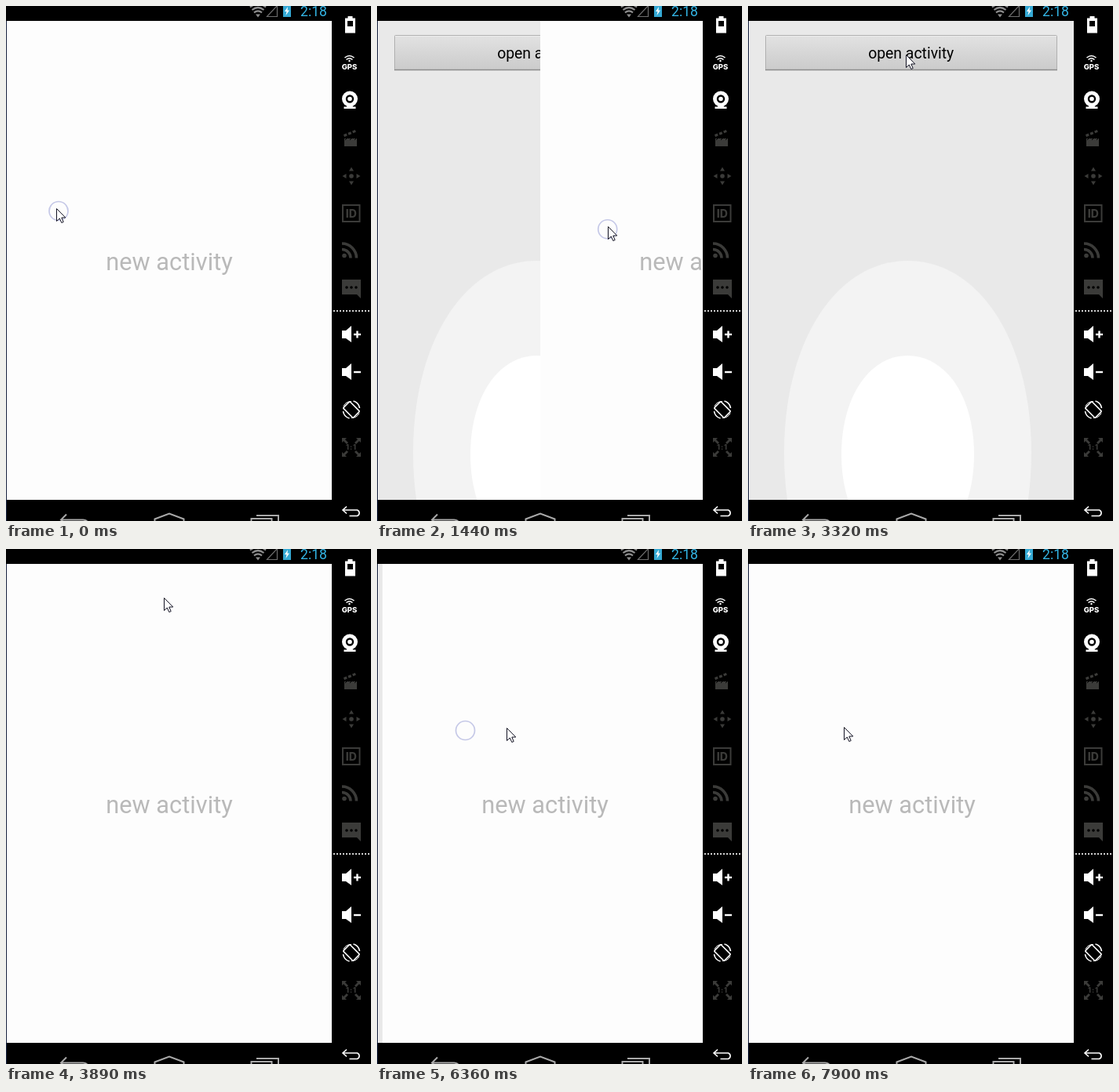
Write an HTML page that moves like this. It is 465 px wide and 657 px high and loops after 8 s.

```html
<!DOCTYPE html>
<html lang="en">
<head>
<meta charset="utf-8">
<title>Swipe back</title>
<style>
html, body { margin: 0; width: 100%; height: 100%; overflow: hidden; background: #000; }
svg { display: block; width: 465px; height: 657px; }
text { font-family: Roboto, sans-serif; }
.line { fill: none; stroke-width: 2; }
.bold { font-family: Inter, sans-serif; font-weight: 800; }
</style>
</head>
<body>
<svg viewBox="0 0 465 657">
  <defs>
    <linearGradient id="face" x1="0" y1="0" x2="0" y2="1">
      <stop offset="0" stop-color="#e2e2e2"/>
      <stop offset="1" stop-color="#cbcbcb"/>
    </linearGradient>
    <g id="speaker">
      <path d="M428 -5h5l7 -6v21l-7 -5h-5z"/>
      <path d="M443 0h9" stroke="#fff" stroke-width="2.4"/>
    </g>
    <path id="corner" d="M0 0h6l-2 2l4 4l-2 2l-4 -4l-2 2z"/>
    <path id="tip" d="M0 -11.5l3 5h-6z"/>
  </defs>

  <!-- first screen -->
  <rect width="415" height="657" fill="#e9e9e9"/>
  <path id="outer" fill="#f3f3f3"/>
  <path id="inner" fill="#fff"/>
  <rect x="22.5" y="37.5" width="371" height="44" rx="1" fill="url(#face)" stroke="#b0b0b0"/>
  <path d="M22 81.5h372" stroke="#8c8c8c" stroke-width="1.4"/>
  <path d="M23 38.5h370" stroke="#ececec"/>
  <text x="207.7" y="67" font-size="19.4" text-anchor="middle">open activity</text>

  <!-- second screen -->
  <g id="page">
    <rect x="1" y="19" width="414" height="611" fill="#fdfdfd"/>
    <text x="208" y="336.5" font-size="30.8" text-anchor="middle" fill="#b9b9b9">new activity</text>
  </g>
  <circle id="ring" r="12" fill="none" stroke="#c5c8e7" stroke-width="1.7"/>
  <path id="arrow" d="M.5 .5V16.5L4.3 13L6.8 18.5L9.2 17.5L6.8 12H11.8Z" fill="#fff" stroke="#112"/>

  <!-- status bar -->
  <rect width="465" height="19"/>
  <g fill="none" stroke="#8d8d8d" stroke-width="2.2">
    <path d="M311 1.5q10 -8 20 0M313.5 5q7.5 -6 15 0M316 8.3q5 -4 10 0"/>
    <path d="M318 10.5h6l-3 4z" fill="#8d8d8d" stroke="none"/>
    <path d="M332.5 13.5h13v-14z" stroke="#6d6d6d" stroke-width="1.2"/>
  </g>
  <rect x="353" y="-1" width="10" height="15" fill="#35a9d4"/>
  <path d="M359 1l-4 6h2.5l-1 5l4.5 -6.5h-2.5z" fill="#fff"/>
  <text x="375" y="12.5" font-size="17.6" fill="#33b5e5">2:18</text>

  <!-- navigation bar -->
  <rect y="630" width="465" height="27"/>
  <g class="line" stroke="#a9a9a9">
    <path d="M77 648.5l-7 7l7 7M70 655.5h28q6 0 6 5"/>
    <path d="M189.5 658v-3.500l18.5 -7l18.5 7v3.5"/>
    <path d="M312.5 658v-4h26v4M319 650h28v8"/>
  </g>
  <path d="M.5 19V657" stroke="#17223f"/>

  <!-- tool strip -->
  <rect x="415" width="50" height="657"/>
  <g fill="#fff">
    <path d="M435.5 13h6v2.5h3.5v19h-13v-19h3.5zM435 19v7h7v-7z" fill-rule="evenodd"/>
    <path d="M431.5 66q6 -5 12 0M433.5 68.5q4 -3.5 8 0" fill="none" stroke="#fff" stroke-width="1.5"/>
    <circle cx="437.5" cy="70" r="1.2"/>
    <text class="bold" x="437.5" y="80.5" font-size="9.5" text-anchor="middle">GPS</text>
    <circle cx="438" cy="118.5" r="10"/>
    <circle cx="438" cy="118.5" r="4" fill="none" stroke="#000" stroke-width="2.4"/>
    <path d="M435 127h6l1 1.5h3.5v2.5h-15v-2.5h3.5z"/>
    <use href="#speaker" y="419"/>
    <path d="M447.5 414.5v9" stroke="#fff" stroke-width="2.4"/>
    <use href="#speaker" y="467"/>
  </g>
  <g fill="none" stroke="#fff" stroke-width="1.6">
    <rect x="434" y="506" width="12" height="18" rx="1.5" transform="rotate(-45 440 515)"/>
    <path d="M429.5 517a11 11 0 0 0 8 9M450.5 513a11 11 0 0 0 -8 -9"/>
    <path d="M440 504.5a11 11 0 0 0 -10 6M440 525.5a11 11 0 0 0 10 -6" stroke-width="1"/>
    <path d="M434 638.5l-5 4.5l5 4.5M429 643h18.5a4 4 0 0 1 0 7.5h-10"/>
  </g>
  <g fill="#3b3b39">
    <path d="M431 169h16v10h-16z"/>
    <path d="M430.5 165.5l16 -6.5" stroke="#3b3b39" stroke-width="3" stroke-dasharray="4 2"/>
    <path d="M432 171l3 -3M438 171l3 -3M444 171l3 -3" stroke="#000"/>
    <g transform="translate(440 217)">
      <circle r="2.8"/>
      <use href="#tip"/>
      <use href="#tip" transform="rotate(90)"/>
      <use href="#tip" transform="rotate(180)"/>
      <use href="#tip" transform="rotate(270)"/>
    </g>
    <rect x="429" y="254" width="21.5" height="21" class="line" stroke="#3b3b39"/>
    <text class="bold" x="439.8" y="269.8" font-size="14" text-anchor="middle">ID</text>
    <circle cx="431" cy="318.5" r="2.8"/>
    <path d="M428 310.5a11 11 0 0 1 11 11M428 303a18.5 18.5 0 0 1 18.5 18.5" fill="none" stroke="#3b3b39" stroke-width="3.6"/>
    <path d="M428 349h24v24l-5 -5h-19z"/>
    <path d="M434 359h.01M440 359h.01M446 359h.01" stroke="#000" stroke-width="3.6" stroke-linecap="round"/>
    <g transform="translate(440 563)">
      <use href="#corner" x="-12" y="-12"/>
      <use href="#corner" x="-12" y="-12" transform="scale(-1 1)"/>
      <use href="#corner" x="-12" y="-12" transform="scale(1 -1)"/>
      <use href="#corner" x="-12" y="-12" transform="scale(-1 -1)"/>
      <text class="bold" y="3.3" font-size="9" text-anchor="middle" letter-spacing="1">1:1</text>
    </g>
  </g>
  <path d="M417 389H465" stroke="#d0d0d0" stroke-width="2" stroke-dasharray="2 2"/>
</svg>
<script>
const $ = id => document.getElementById(id);
const LOOP = 8000;

// bursts of movement: first step, last step, number of steps
const bursts = [
  [150, 1140, 8], [1290, 2250, 8], [2370, 2920, 5], [3320, 3320, 1],
  [3630, 4460, 7], [4740, 5310, 5], [5590, 6630, 9], [6750, 7200, 4], [7630, 7900, 3]
];

// time, page shift
const slide = [
  [150, 0], [857, 140], [1140, 168], [1564, 225], [1701, 340], [1838, 410], [1976, 415],
  [3320, 415], [3630, 260], [3768, 60], [3906, 0], [4460, 0], [4740, 18], [5025, 76],
  [5310, 85], [6110, 0], [6240, 0], [6370, 6], [6630, 97], [7200, 180], [7630, 165],
  [7765, 60], [7900, 1]
];

// time, pointer x, y
const pointer = [
  [0, 64, 258], [857, 220, 274], [1564, 312, 283], [1838, 324, 283], [2250, 220, 111],
  [2920, 200, 68], [3320, 201, 62], [3906, 201, 62], [4460, 72, 215], [5025, 159, 223],
  [5310, 167, 225], [6110, 100, 226], [6370, 165, 228], [6630, 197, 232],
  [7200, 277, 237], [7900, 122, 227]
];

// time, ring x from the pointer
const lag = [[0, 3], [857, -0.5], [6110, 0], [6370, -52.5], [6630, -2]];

function snap(t) {
  let s = 0;
  for (const [a, b, n] of bursts) {
    if (t < a) break;
    const gap = n > 1 ? (b - a) / (n - 1) : 1;
    s = a + gap * Math.min(n - 1, Math.floor((t - a) / gap + 0.15));
  }
  return s;
}

function at(track, t) {
  const i = track.findIndex(k => k[0] >= t);
  if (i < 0) return track[track.length - 1].slice(1);
  if (i === 0) return track[0].slice(1);
  const a = track[i - 1], b = track[i], u = (t - a[0]) / (b[0] - a[0]);
  return a.map((v, j) => v + (b[j] - v) * u).slice(1);
}

// slightly squarish oval
function oval(cx, cy, rx, ry) {
  const k = 0.58, l = cx - rx, r = cx + rx, y = cy - ry, h = cy + ry;
  return `M${l} ${cy}C${l} ${cy - k * ry} ${cx - k * rx} ${y} ${cx} ${y}` +
    `S${r} ${cy - k * ry} ${r} ${cy}S${cx + k * rx} ${h} ${cx} ${h}` +
    `S${l} ${cy + k * ry} ${l} ${cy}Z`;
}

const move = (id, x, y) => $(id).setAttribute("transform", `translate(${x} ${y})`);

function draw(now) {
  const t = snap(now % LOOP);
  const [shift] = at(slide, t), [x, y] = at(pointer, t), [dx] = at(lag, t);
  move("page", Math.round(shift), 0);
  move("arrow", Math.round(x), Math.round(y));
  move("ring", x + dx, y + 3.5);
  const touch = t < 1500 || (t > 4400 && t < 7700);
  $("ring").style.display = touch ? "" : "none";
}

$("outer").setAttribute("d", oval(203.5, 570, 157.5, 245));
$("inner").setAttribute("d", oval(203.5, 572, 84.5, 126));

const start = performance.now();
function tick() {
  draw(performance.now() - start);
  requestAnimationFrame(tick);
}
tick();
</script>
</body>
</html>
```
